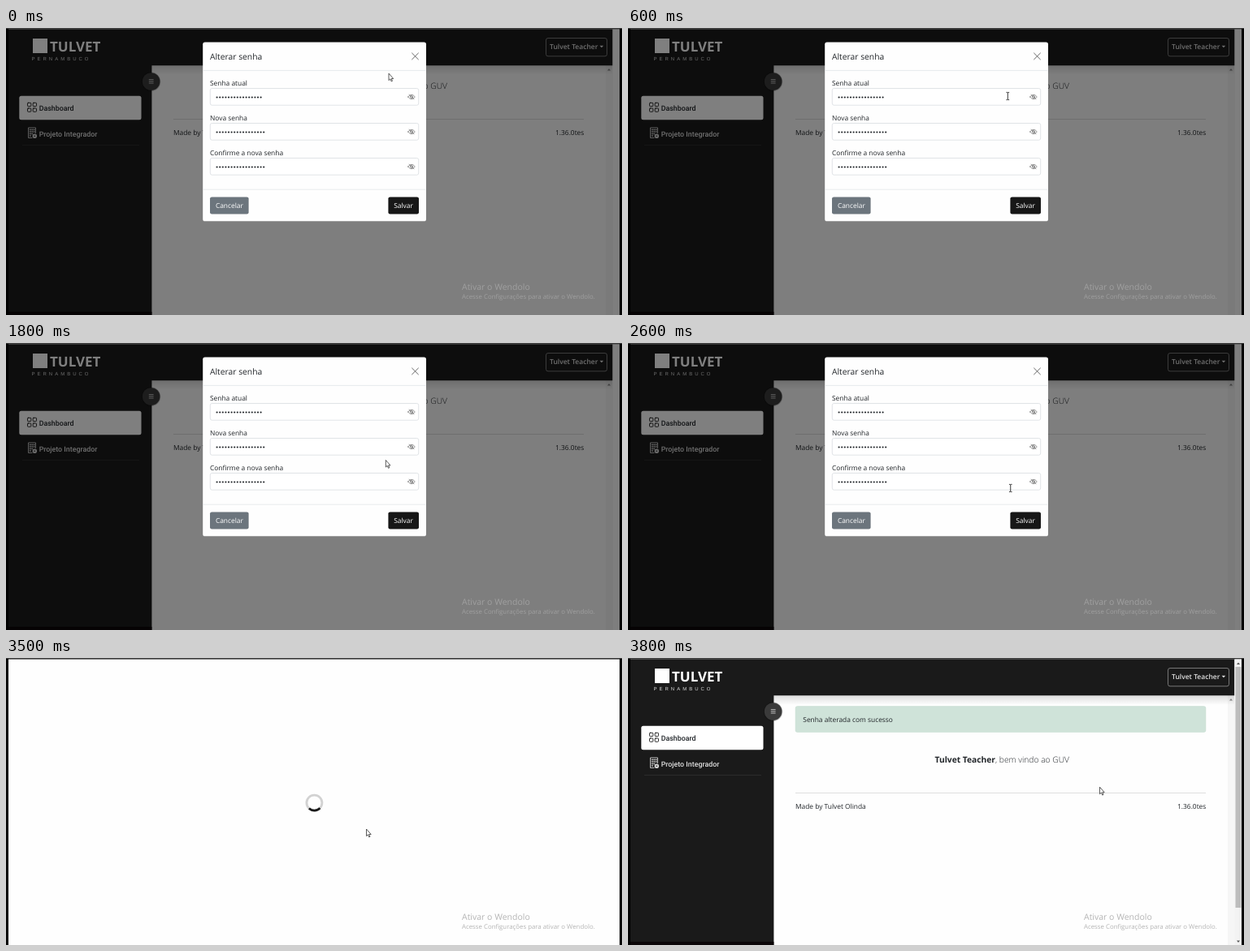
These frames come from a looping animation (758 px wide and 354 px high, 4400 ms). An HTML page:

```html
<!DOCTYPE html>
<html lang="pt-BR">
<head>
<meta charset="utf-8">
<title>Alterar senha</title>
<style>
  html, body { margin: 0; width: 100%; height: 100%; overflow: hidden; background: #000; }
  svg { display: block; width: 758px; height: 354px; }
  text { font: 8.4px "Open Sans", "Noto Sans", sans-serif; fill: #212529; text-rendering: geometricPrecision; white-space: pre; }
  .menu { font: 500 8.85px Roboto, sans-serif; }
  .brand { font-weight: 700; font-size: 17px; fill: #fff; }
  .tag { font: 6px "Liberation Sans", sans-serif; letter-spacing: 3px; fill: #ddd; }
  .user { font-size: 8.5px; font-weight: 600; fill: #e4e4e4; }
  .hello { font-size: 10.25px; font-weight: 300; }
  .hello .b { font-weight: 700; }
  .title { font-size: 10.3px; }
  .btn { font-weight: 500; fill: #fff; }
  .mark text { fill: #b4b4b4; }
  .mark.dim text { fill: #a0a0a0; }
  .mark .big { font-size: 10.5px; }
  .mark .small { font-size: 7.83px; }
  .line { fill: none; stroke-linecap: round; stroke-linejoin: round; }
</style>
</head>
<body>
<svg viewBox="0 0 758 354" xmlns="http://www.w3.org/2000/svg">
  <defs>
    <linearGradient id="fade" x1="0" y1="0" x2="0" y2="1">
      <stop offset="0" stop-color="#000" stop-opacity=".13"/>
      <stop offset="1" stop-color="#000" stop-opacity="0"/>
    </linearGradient>
    <g id="eye" class="line" stroke="#666" stroke-width=".7">
      <path d="M-4.3 0Q0 -5.6 4.3 0Q0 5.6 -4.3 0Z"/>
      <circle r="1.5"/>
      <path d="M-3 -2.6L3 2.6"/>
    </g>
  </defs>

  <rect width="758" height="354" fill="#000"/>
  <rect width="758" height="1" fill="#3c3c3c"/>
  <rect x="3" y="1.5" width="752" height="353" fill="#fefefe"/>

  <g id="page">
    <g id="body">
      <g id="alert">
        <rect x="206.1" y="59.6" width="504.8" height="31.9" rx="2.2" fill="#cfe3d9" stroke="#c3dbcf" stroke-width=".5"/>
        <text x="215.3" y="79">Senha alterada com sucesso</text>
      </g>
      <text class="hello" y="129"><tspan class="b" x="452" text-anchor="end">Tulvet Teacher</tspan><tspan x="452" text-anchor="start">, bem vindo ao GUV</tspan></text>
      <rect x="206" y="166" width="505" height="1" fill="#dedede"/>
      <text x="206" y="185.8">Made by Tulvet Olinda</text>
      <text x="711.3" y="185.8" text-anchor="end">1.36.0tes</text>
    </g>

    <rect x="738" y="46" width="9" height="308" fill="#f6f6f6"/>
    <path d="M740 52.5h4l-2 -2.6z" fill="#8a8a8a"/>
    <rect x="179" y="46" width="567" height="12" fill="url(#fade)"/>
    <path d="M3 1.5H746.3V46.2H179.4V354H3Z" fill="#1a1a1a"/>
    <rect x="3" y="350" width="176.4" height="4" fill="#0c0709"/>

    <rect x="33" y="13" width="18" height="18" fill="#fff"/>
    <text class="brand" x="54" y="28.5">TULVET</text>
    <text class="tag" x="31.5" y="40">PERNAMBUCO</text>

    <rect x="664.5" y="12.5" width="75" height="22.3" rx="2.5" fill="none" stroke="#8f8f8f" stroke-width=".8"/>
    <text class="user" x="669" y="26">Tulvet Teacher</text>
    <path d="M730.6 21.8h4.6l-2.3 2.5z" fill="#e4e4e4"/>

    <rect x="16.3" y="83.8" width="150.2" height="29.4" rx="2.5" fill="#fff"/>
    <g class="line" stroke="#1a1a1a" stroke-width=".9">
      <rect x="26.5" y="92.3" width="4.3" height="4.3" rx=".8"/>
      <rect x="33.2" y="92.3" width="4.3" height="4.3" rx=".8"/>
      <rect x="26.5" y="99" width="4.3" height="4.3" rx=".8"/>
      <rect x="33.2" y="99" width="4.3" height="4.3" rx=".8"/>
    </g>
    <text class="menu" x="40.7" y="102.3">Dashboard</text>

    <g class="line" stroke="#d0d0d0" stroke-width=".9">
      <path d="M32 135.5H27.5V123H36.5V129.5"/>
      <path d="M29.4 125.5H35M29.4 128H35M29.4 130.5H32.5M29.4 133H31.5" stroke-width="1.5" stroke-dasharray=".8 1.7"/>
      <circle cx="35.3" cy="133.2" r="1.8" stroke-width="2"/>
    </g>
    <text class="menu" x="40.7" y="134" style="fill:#e0e0e0">Projeto Integrador</text>
    <rect x="20" y="144.2" width="144" height=".7" fill="#333"/>

    <circle cx="178.6" cy="66.2" r="11.6" fill="#000" opacity=".25"/>
    <circle cx="178.6" cy="66" r="10.8" fill="#3a3a3a"/>
    <path d="M175.8 63.6h5.8M175.8 65.8h5.8M175.8 68h5.8" stroke="#ddd" stroke-width=".8"/>
  </g>

  <g id="scroll">
    <rect x="746.5" y="1.5" width="8.5" height="353" fill="#f3f3f3"/>
    <rect x="747.5" y="11" width="7" height="297" fill="#bdbdbd"/>
    <path d="M749 8h4l-2 -2.6zM749 348.5h4l-2 2.6z" fill="#555"/>
  </g>

  <g id="modal">
    <rect x="3" y="1.5" width="752" height="353" opacity=".5"/>
    <rect x="242.2" y="17.6" width="274.8" height="220.7" rx="2.6" fill="#fefefe"/>
    <path d="M242.6 52.4H516.6M242.6 199.2H516.6" stroke="#dee2e6" stroke-width=".7"/>
    <text class="title" x="251" y="39">Alterar senha</text>
    <path d="M499.6 31L507.4 38.8M507.4 31L499.6 38.8" class="line" stroke="#555" stroke-width=".9"/>
    <g id="fields"></g>
    <rect x="251" y="208.4" width="47.6" height="21" rx="2.2" fill="#6c757d"/>
    <text class="btn" x="257.9" y="222">Cancelar</text>
    <rect x="470.4" y="208.4" width="37.6" height="21" rx="2.2" fill="#171717"/>
    <text class="btn" x="477.2" y="222">Salvar</text>
  </g>

  <g id="load">
    <circle cx="379.4" cy="178.6" r="9.5" fill="none" stroke="#d2d2d2" stroke-width="2.8"/>
    <path id="arc" d="M6.72 -6.72A9.5 9.5 0 0 1 6.72 6.72" fill="none" stroke="#1a1a1a" stroke-width="2.8"/>
  </g>

  <g id="mark" class="mark">
    <text class="big" x="561" y="323">Ativar o Wendolo</text>
    <text class="small" x="561" y="334">Acesse Configurações para ativar o Wendolo.</text>
  </g>

  <g id="cursor">
    <path id="arrow" d="M0 0V8.6L1.9 6.9L3.2 9.9L4.5 9.3L3.2 6.5H5.7Z" fill="#fff" stroke="#333" stroke-width=".8" stroke-linejoin="round"/>
    <path id="beam" d="M-1.8 -4.6H-.5L0 -4.2L.5 -4.6H1.8M0 -4.2V4.2M-1.8 4.6H-.5L0 4.2L.5 4.6H1.8" fill="none" stroke="#222" stroke-width=".9"/>
    <path id="hand" d="M-.9 .4Q0 -.6 .9 .4V4Q1.8 3.4 2.5 4.3Q3.4 3.8 4 4.8Q5 4.5 5.2 5.6V8Q5 9.5 4.2 11H-1.4Q-2.2 9 -4 7.2Q-4.2 5.6 -2.5 6L-.9 7.2Z" fill="#fff" stroke="#111" stroke-width=".7" stroke-linejoin="round"/>
  </g>
</svg>

<script>
const LOOP = 4400, STEP = 100, LOAD = 3500, DONE = 3800;
const $ = id => document.getElementById(id);
const show = (id, on) => $(id).setAttribute('display', on ? 'inline' : 'none');

const fields = [['Senha atual', 74.5, 16], ['Nova senha', 117.5, 17], ['Confirme a nova senha', 160.5, 17]];
$('fields').innerHTML = fields.map(([label, y, count]) => {
  let dots = '';
  for (let i = 0; i < count; i++) dots += `<circle cx="${259.6 + i * 3.6}" cy="${y + 11}" r="1.1" fill="#212529"/>`;
  return `<text x="251" y="${y - 3.5}">${label}</text>
    <rect x="251.3" y="${y}" width="256.4" height="20.7" rx="2.2" fill="#fff" stroke="#d5d9dd" stroke-width=".7"/>
    ${dots}<use href="#eye" x="499" y="${y + 10.5}"/>`;
}).join('');

// Pointer moves: start, number of steps, end x, end y, ease-out power
const moves = [
  [0, 1, 471, 56, 1],
  [100, 2, 468.5, 77.5, 1],
  [400, 1, 468, 82, 1],
  [600, 1, 467.3, 84, 1],
  [1000, 6, 467.3, 125, 1],
  [1800, 4, 467.3, 169.5, 2],
  [2600, 5, 484.5, 217, 1],
  [LOAD, 1, 443.5, 211, 1],
  [DONE, 1, 580.5, 159.2, 1]
];

function pointer(t) {
  let x = 471, y = 56;
  for (const [start, steps, tx, ty, power] of moves) {
    if (t < start) break;
    const p = Math.min(1, (Math.floor((t - start) / STEP) + 1) / steps);
    const k = 1 - (1 - p) ** power;
    x += (tx - x) * k;
    y += (ty - y) * k;
  }
  return [x, y];
}

function shape(x, y) {
  if (fields.some(f => y >= f[1] && y <= f[1] + 20.7)) return 'beam';
  return x > 470 && y > 208 ? 'hand' : 'arrow';
}

function draw(t) {
  const form = t < LOAD, done = t >= DONE, busy = !form && !done;
  show('page', !busy);
  show('modal', form);
  show('alert', done);
  show('scroll', done);
  show('load', busy);
  $('body').setAttribute('transform', `translate(0 ${form ? -54 : 0})`);
  $('mark').setAttribute('class', form ? 'mark dim' : 'mark');

  const turn = 88 + 43 * Math.floor((t - LOAD) / STEP);
  $('arc').setAttribute('transform', `translate(379.4 178.6) rotate(${turn})`);

  const [x, y] = pointer(t), kind = form ? shape(x, y) : 'arrow';
  for (const k of ['arrow', 'beam', 'hand']) show(k, k === kind);
  $('cursor').setAttribute('transform', `translate(${x} ${y})`);
}

const begin = performance.now();
function tick() {
  draw((performance.now() - begin) % LOOP);
  requestAnimationFrame(tick);
}
tick();
</script>
</body>
</html>
```
